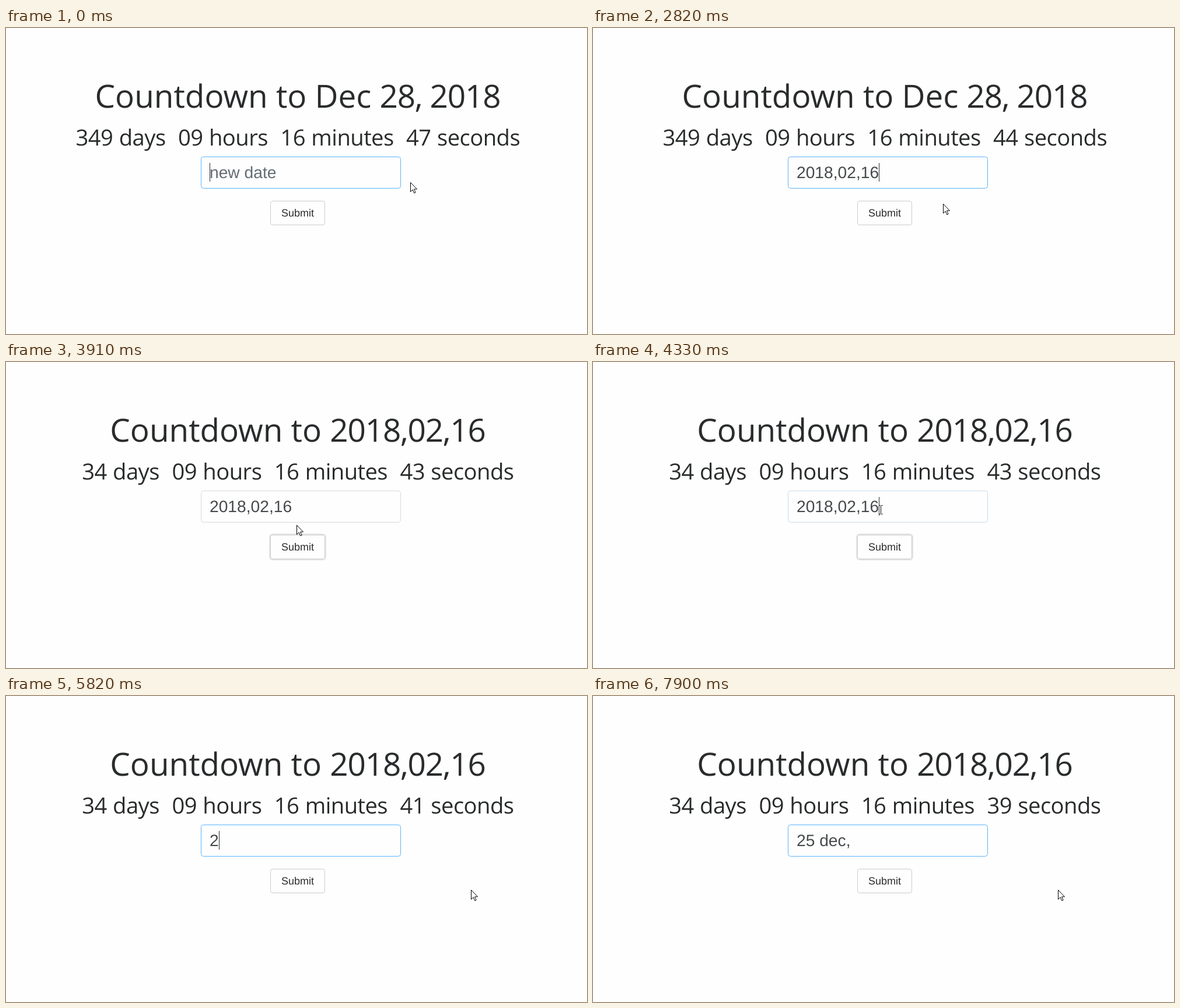
Write an HTML page that moves like this. It is 996 px wide and 526 px high and loops after 8000 ms.

```html
<!DOCTYPE html>
<html lang="en">
<head>
<meta charset="utf-8">
<title>Countdown</title>
<style>
  html, body { margin: 0; width: 100%; height: 100%; overflow: hidden; background: #fefefe; }
  svg { display: block; width: 996px; height: 526px; }
  text { fill: #292b2c; text-rendering: geometricPrecision; }
  .head { font-family: "Open Sans", "Noto Sans", sans-serif; text-anchor: middle; white-space: pre; }
  #title { font-size: 54.8px; }
  #date { letter-spacing: -1.1px; }
  #clock { font-size: 38.2px; letter-spacing: -.55px; word-spacing: 1px; }
  .form { font-family: "Liberation Sans", Arial, sans-serif; }
  #value { font-size: 28.2px; }
  #label { font-size: 18px; text-anchor: middle; }
</style>
</head>
<body>
<svg viewBox="0 0 996 526">
  <text id="title" class="head" x="500" y="137"><tspan id="lead"></tspan><tspan id="date"></tspan></text>
  <text id="clock" class="head" x="500.3" y="202"><tspan id="days"></tspan><tspan dx="21.4">09 hours</tspan><tspan dx="21.4">16 minutes</tspan><tspan id="secs" dx="21.4"></tspan></text>

  <rect id="field" x="334.5" y="221.5" width="342" height="54" rx="4" fill="#fefefe"/>
  <rect id="mark" x="349" y="232" width="141" height="32" fill="#0078d7"/>
  <text id="value" class="form" x="349" y="258"></text>
  <rect id="caret" y="232" width="1" height="32" fill="#292b2c"/>

  <rect id="ring" x="452" y="296" width="96" height="44" rx="5" fill="none" stroke="#ccc" stroke-opacity=".5" stroke-width="2"/>
  <rect id="button" x="453.5" y="297.5" width="93" height="41" rx="3.5"/>
  <text id="label" class="form" x="500" y="324">Submit</text>

  <g id="pointer">
    <path id="arrow" d="M.5 .5V16.5L4.2 13L6.7 18.8L9.1 17.8L6.6 12H11.5Z" fill="#fff" stroke="#000"/>
    <path id="beam" d="M-3 -7.5H-1L0 -6.5L1 -7.5H3M0 -6.5V6.5M-3 7.5H-1L0 6.5L1 7.5H3" fill="none" stroke="#000"/>
  </g>
</svg>
<script>
const LOOP = 8000;
const FOCUS = "#5cb3fd";
const el = id => document.getElementById(id);
const show = (id, on) => el(id).setAttribute("visibility", on ? "visible" : "hidden");

const first = {
  month: "Dec ", date: "28, 2018", days: 349, secs: 47, text: "", caret: true, selected: false,
  border: FOCUS, ring: false, hover: false, mouse: [693, 265], beam: false
};

// Each step: time in ms, then whatever changes at that moment.
const steps = [
  [150, { text: "2" }],
  [300, { text: "20" }],
  [450, { text: "2018" }],
  [750, { text: "2018," }],
  [870, { secs: 46 }],
  [1150, { text: "2018,0" }],
  [1290, { text: "2018,02" }],
  [1430, { text: "2018,02," }],
  [1570, { text: "2018,02,1" }],
  [1980, { secs: 45 }],
  [2120, { text: "2018,02,16" }],
  [2270, { caret: false }],
  [2680, { mouse: [668, 276], caret: true }],
  [2815, { mouse: [600, 302], secs: 44 }],
  [2950, { mouse: [535, 320], hover: true }],
  [3080, { mouse: [507, 327] }],
  [3205, { caret: false, ring: true }],
  [3330, { month: "", date: "2018,02,16", border: "#c8d8e4" }],
  [3480, { border: "#d9d9d9" }],
  [3780, { days: 34, secs: 43, mouse: [505, 317] }],
  [3910, { mouse: [498, 280], hover: false }],
  [4050, { mouse: [493.5, 254], beam: true }],
  [4330, { caret: true, border: "#c5dae9" }],
  [4450, { caret: false, selected: true, border: FOCUS, ring: false, mouse: [246.5, 254] }],
  [4750, { mouse: [300, 262], beam: false }],
  [4880, { mouse: [520, 284], secs: 42 }],
  [5010, { mouse: [730, 322] }],
  [5140, { mouse: [797, 333] }],
  [5690, { text: "2", selected: false, caret: true }],
  [5820, { secs: 41 }],
  [5960, { text: "25" }],
  [6370, { text: "25 " }],
  [6790, { text: "25 d", secs: 40 }],
  [7220, { text: "25 de" }],
  [7500, { text: "25 dec" }],
  [7770, { text: "25 dec,", secs: 39 }],
  [7900, { caret: false }]
];

function render(s) {
  el("lead").textContent = "Countdown to " + s.month;
  el("date").textContent = s.date;
  el("days").textContent = s.days + " days";
  el("secs").textContent = s.secs + " seconds";

  const value = el("value");
  value.textContent = s.text.replace(/ /g, "\u00a0");
  const width = s.text ? value.getComputedTextLength() : 0;
  if (!s.text) value.textContent = "new date";
  value.style.fill = s.selected ? "#fff" : s.text ? "#464a4c" : "#636c72";
  el("caret").setAttribute("x", Math.round(349 + width));
  show("caret", s.caret);
  show("mark", s.selected);
  el("field").setAttribute("stroke", s.border);

  show("ring", s.ring);
  el("button").setAttribute("fill", s.hover ? "#e6e6e6" : "#fefefe");
  el("button").setAttribute("stroke", s.hover ? "#adadad" : "#ccc");

  el("pointer").setAttribute("transform", `translate(${s.mouse})`);
  show("arrow", !s.beam);
  show("beam", s.beam);
}

const start = performance.now();
let shown = -1;

function tick() {
  const t = (performance.now() - start) % LOOP;
  const past = steps.filter(([at]) => at <= t);
  if (past.length !== shown) {
    shown = past.length;
    render(Object.assign({}, first, ...past.map(([, change]) => change)));
  }
  requestAnimationFrame(tick);
}
tick();
</script>
</body>
</html>
```
